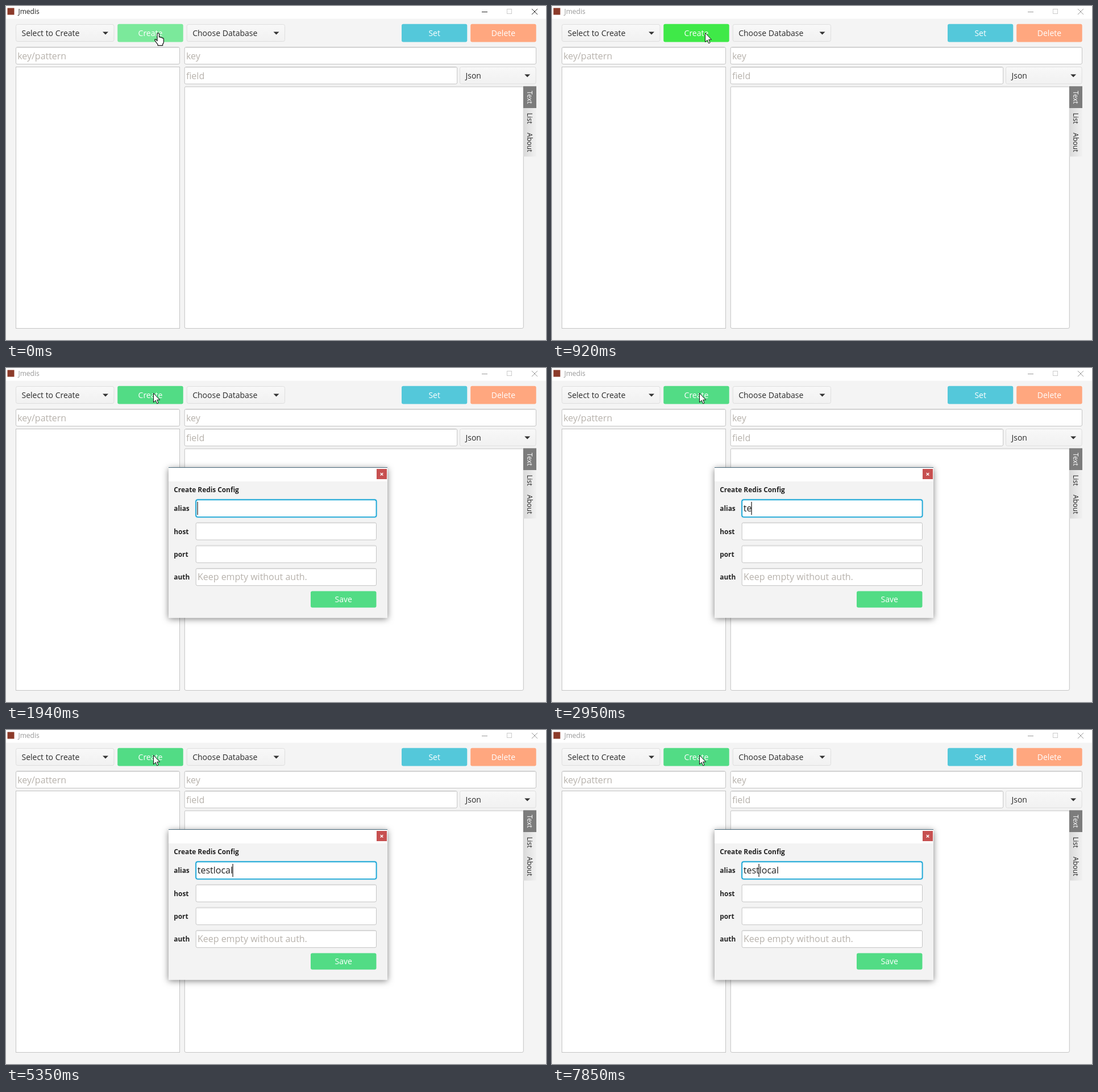
Recreate the animation shown at these times as an HTML page. Size 950 by 589 pixels, loop 8000 ms.

```html
<!DOCTYPE html>
<html lang="en">
<head>
<meta charset="utf-8">
<title>Jmedis</title>
<style>
  html, body { margin: 0; width: 100%; height: 100%; overflow: hidden; background: #f4f4f4; }
  svg { display: block; width: 950px; height: 589px; }
  text { font: 14px "Open Sans", "Noto Sans", sans-serif; fill: #2b2b2b; white-space: pre; }
  .input { fill: #fff; stroke: #c4c4c4; }
  .combo { fill: url(#comboFill); stroke: #dedede; }
  .hint { font-size: 16px; fill: #b7b2ac; }
  .typed { font-size: 16px; fill: #222; }
  .label { font-size: 11.85px; font-weight: 700; fill: #222; }
  .button { fill: #fff; text-anchor: middle; }
  .tab { font-size: 12px; text-anchor: middle; }
  .pointer { fill: #fff; stroke: #111; stroke-linejoin: round; }
</style>
</head>
<body>
<svg viewBox="0 0 950 589">
  <defs>
    <linearGradient id="comboFill" x2="0" y2="1">
      <stop stop-color="#f8f8f8"/><stop offset="1" stop-color="#f1f1f1"/>
    </linearGradient>
    <linearGradient id="tabFill">
      <stop stop-color="#d9d9d9"/><stop offset="1" stop-color="#f1f1f1"/>
    </linearGradient>
    <filter id="shadow" x="-10%" y="-10%" width="120%" height="125%">
      <feDropShadow dx="0" dy="2" stdDeviation="6" flood-color="#000" flood-opacity=".5"/>
    </filter>
  </defs>

  <rect width="950" height="589" fill="#f4f4f4"/>
  <rect width="950" height="22.5" fill="#fff"/>
  <rect x="2.5" y="3.5" width="12" height="12" fill="#8c3b2a"/>
  <text id="title" x="21.5" y="14" style="font-size:12px">Jmedis</text>
  <g id="controls" fill="none" stroke="#222">
    <path d="M837 10.5H847M925 5L935 15M935 5L925 15"/>
    <rect x="881.5" y="5.5" width="8" height="8" stroke="#ccc"/>
  </g>

  <g id="main"></g>

  <rect x="910" y="141.5" width="23" height="124" fill="url(#tabFill)"/>
  <rect x="910" y="141.5" width="23" height="38.5" fill="#7c7c7c"/>
  <g id="tabs"></g>

  <g id="dialog">
    <rect x="286" y="175.5" width="385" height="265" fill="#f3f3f3" filter="url(#shadow)"/>
    <rect x="286" y="176" width="385" height="24" fill="#fff"/>
    <path d="M286 175.5H671" stroke="#4a6a7c"/>
    <rect x="652" y="178" width="18" height="18" fill="#c75050"/>
    <path d="M658.7 185L663.3 189.6M663.3 185L658.7 189.6" stroke="#fff" stroke-width="1.4"/>
    <g id="form"></g>
    <g fill="#fff" stroke="#039ed3">
      <rect x="334.2" y="232.4" width="317.3" height="30.4" rx="3" stroke-width="4.4" stroke-opacity=".13"/>
      <rect x="334.2" y="232.4" width="317.3" height="30.4" rx="3" stroke-width="1.6"/>
    </g>
    <text id="alias" class="typed" x="336.8" y="253"></text>
    <rect id="caret" y="236" width="1.25" height="23" fill="#222"/>
  </g>

  <path id="hand" class="pointer" stroke-width="1.2"
    d="M266 62V49.5Q266 47.6 267.7 47.6T269.5 49.5V55Q270.8 53.7 272 55.6Q273.6 54.4 274.6 56.6Q277.4 55.8 277.4 59V63Q277.4 66 275.6 67.2V69.6H267V67.6Q264.8 65.4 261.9 60.8Q261.3 58.6 263.2 58.7Q264.6 59.3 266 61.4"/>
  <path id="arrow" class="pointer" d="M0 0V16L3.7 12.6L6.2 18.3L8.6 17.2L6.2 11.7H11Z"/>
</svg>
<script>
const $ = id => document.getElementById(id);
const NS = "http://www.w3.org/2000/svg";

function add(parent, tag, attrs, content = "") {
  const node = document.createElementNS(NS, tag);
  for (const key in attrs) node.setAttribute(key, attrs[key]);
  node.textContent = content;
  parent.append(node);
  return node;
}

function text(parent, cls, x, y, content) {
  return add(parent, "text", { class: cls, x, y }, content);
}

function input(parent, x, y, width, height, hint = "") {
  add(parent, "rect", { class: "input", x, y, width, height, rx: 2.5 });
  add(parent, "path", { d: `M${x + 1.5} ${y + 1}h${width - 3}`, stroke: "#e3e3e3" });
  if (hint) text(parent, "hint", x + 2.7, y + 21, hint);
}

function combo(x, y, width, content) {
  add($("main"), "rect", { class: "combo", x, y, width, height: 30, rx: 3 });
  text($("main"), "", x + 10, y + 20.5, content);
  add($("main"), "path", { d: `M${x + width - 20} ${y + 13}h10l-5 5z`, fill: "#333" });
}

function button(parent, x, y, width, height, fill, content) {
  const box = add(parent, "rect", { x, y, width, height, rx: 3, fill });
  text(parent, "button", x + width / 2, y + height / 2 + 5.2, content);
  return box;
}

const main = $("main"), form = $("form");
combo(17.5, 32.5, 172.5, "Select to Create");
const create = button(main, 196.2, 31.7, 115.5, 31.8, "#7be99b", "Create");
combo(318.2, 32.5, 172.3, "Choose Database");
button(main, 696, 31.7, 115.3, 31.8, "#54c8da", "Set");
button(main, 817.2, 31.7, 115.5, 31.8, "#ffa77f", "Delete");
input(main, 17.5, 72.5, 288, 30, "key/pattern");
input(main, 314.2, 72.5, 618.3, 30, "key");
add(main, "rect", { class: "input", x: 17.5, y: 107.5, width: 288, height: 461 });
input(main, 314.2, 107.5, 479.5, 30, "field");
combo(798.5, 107.5, 133.7, "Json");
input(main, 314.3, 142, 596, 426.5);

[["Text", 161, "#fff"], ["List", 198, "#222"], ["About", 240.5, "#222"]].forEach(([name, y, color]) =>
  add($("tabs"), "text", {
    class: "tab", transform: `translate(917.3 ${y}) rotate(90)`, style: `fill:${color}`
  }, name));

text(form, "label", 295.3, 219.3, "Create Redis Config");
["alias", "host", "port", "auth"].forEach((name, i) => {
  const y = 232.5 + i * 40.3;
  text(form, "label", 295.3, y + 19.7, name);
  if (i) input(form, 334.2, y, 317.3, 30.3, name === "auth" ? "Keep empty without auth." : "");
});
button(form, 536, 393.5, 115.5, 29, "#52dc85", "Save");

const LOOP = 8000, WORD = "testlocal", OPEN = 1010, INACTIVE = 920;

// [start ms, letters shown, caret position or -1 when hidden]
const typing = [
  [1010, 0, 0], [1470, 0, -1], [1940, 0, 0], [2490, 0, -1],
  [2950, 2, 2], [3110, 3, 3], [3410, 4, 4], [3960, 4, -1], [4420, 4, 4],
  [4740, 5, 5], [4890, 6, 6], [5120, 7, 7], [5200, 8, 8], [5350, 9, 9],
  [5900, 9, -1], [6370, 9, 9], [6830, 9, -1],
  [7150, 9, 8], [7380, 9, 7], [7550, 9, 6], [7700, 9, 5], [7850, 9, 4]
];

// [start ms, fill, pointer, arrow position]
const pressing = [
  [0, "#7be99b", "hand", ""],
  [690, "#3fe948", "hand", ""],
  [770, "#3fe948", "arrow", "269.5 47.5"],
  [1010, "#52dc85", "arrow", "259.5 44.5"]
];

const stepAt = (steps, time) => steps.findLast(step => step[0] <= time);
const show = (id, on) => $(id).setAttribute("visibility", on ? "visible" : "hidden");

function draw(time) {
  const [, fill, pointer, place] = stepAt(pressing, time);
  create.setAttribute("fill", fill);
  show("hand", pointer === "hand");
  show("arrow", pointer === "arrow");
  if (place) $("arrow").setAttribute("transform", `translate(${place})`);

  const active = time < INACTIVE;
  $("title").style.fill = active ? "#222" : "#999";
  $("controls").setAttribute("stroke", active ? "#222" : "#999");

  const open = time >= OPEN;
  $("dialog").style.display = open ? "" : "none";
  if (!open) return;
  const [, count, caret] = stepAt(typing, time);
  const alias = $("alias");
  alias.textContent = WORD.slice(0, count);
  show("caret", caret >= 0);
  const end = 336.8 + (caret > 0 ? alias.getSubStringLength(0, caret) : 0);
  $("caret").setAttribute("x", Math.floor(end - 0.8) + 0.4);
}

const start = performance.now();
function tick() {
  draw((performance.now() - start) % LOOP);
  requestAnimationFrame(tick);
}
tick();
</script>
</body>
</html>
```
